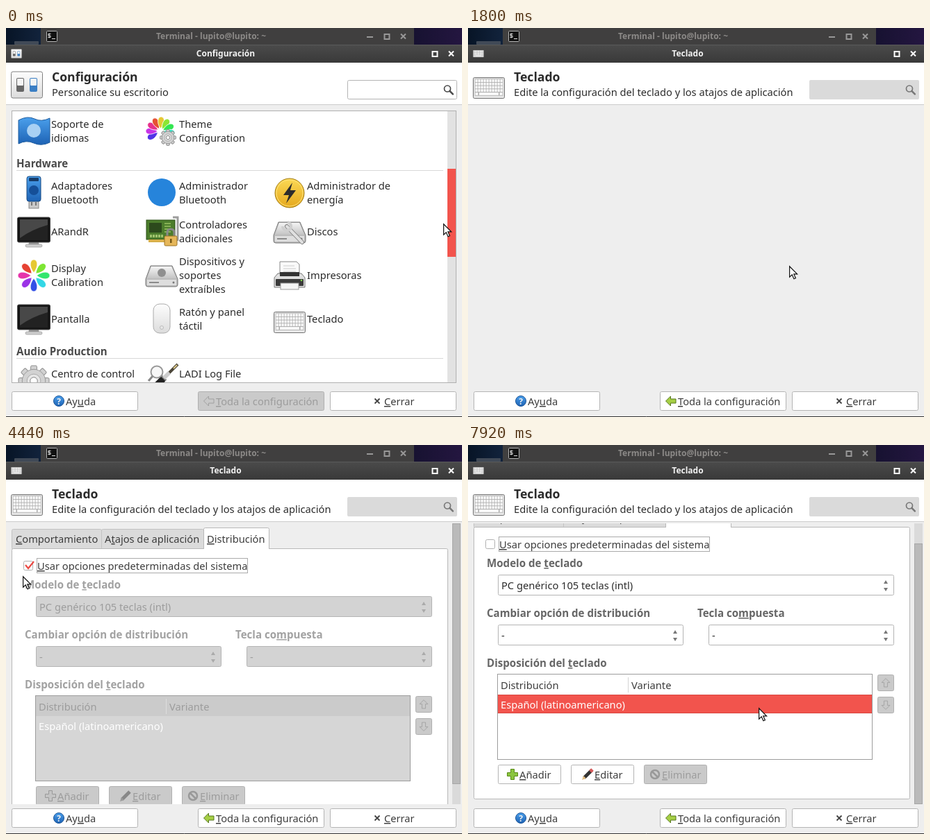
An HTML page that plays this animation: 656 px wide and 561 px high, repeating every 8 s.

```html
<!DOCTYPE html>
<html lang="es">
<head>
<meta charset="utf-8">
<title>Configuración del teclado</title>
<style>
html, body { margin: 0; width: 100%; height: 100%; overflow: hidden; background: #ededed; }
svg { display: block; width: 656px; height: 561px; }
text { font: 14.667px "Noto Sans", sans-serif; fill: #3c3c3c; white-space: pre; }
.ink { fill: #2b2b2b; }
.dim { fill: #9c9c9c; }
.lit { fill: #fff; }
.b { font-weight: bold; font-size: 15.1px; fill: #666; }
.b.sec { fill: #4a4a4a; }
.b.off { fill: #a2a2a2; }
.h { font-weight: bold; font-size: 17.6px; fill: #2b2b2b; }
.w { font-weight: bold; font-size: 12px; fill: #f2f2f2; text-anchor: middle; }
.w.back { fill: #8c8a88; }
.u { text-decoration: underline; text-decoration-thickness: 1px; }

.anim { animation: 8s step-end infinite; }
#list { animation-name: first; }
#board { animation-name: second; }
#behave { animation-name: behave; }
#layoutOff { animation-name: layoutOff; }
#layoutOn { animation-name: layoutOn; }
#pageBar { animation-name: pageBar; }
#items { animation-name: items; }
#thumb { animation-name: thumb; }
#page { animation-name: page; }
#pageThumb { animation-name: pageThumb; }
#cursor { animation-name: cursor; }

@keyframes first { 0% { opacity: 1 } 22.5%, to { opacity: 0 } }
@keyframes second { 0% { opacity: 0 } 22.5%, to { opacity: 1 } }
@keyframes pageBar { 0% { opacity: 0 } 24%, to { opacity: 1 } }
@keyframes behave { 0% { opacity: 0 } 24% { opacity: 1 } 45%, to { opacity: 0 } }
@keyframes layoutOff { 0% { opacity: 0 } 45% { opacity: 1 } 61.5%, to { opacity: 0 } }
@keyframes layoutOn { 0% { opacity: 0 } 61.5%, to { opacity: 1 } }
@keyframes items {
  0% { transform: translateY(0) } 1.5% { transform: translateY(-26px) }
  3% { transform: translateY(-52px) } 4.5%, to { transform: translateY(-76px) }
}
@keyframes thumb {
  0% { transform: translateY(0); fill: #f2544d } 1.5% { transform: translateY(9px); fill: #f2544d }
  3% { transform: translateY(17px); fill: #f2544d } 4.5% { transform: translateY(25px); fill: #f2544d }
  7.5%, to { transform: translateY(25px); fill: #bababa }
}
@keyframes page {
  0% { transform: translateY(0) } 87% { transform: translateY(-4px) } 88.5% { transform: translateY(-10px) }
  90% { transform: translateY(-16px) } 91.5% { transform: translateY(-22px) }
  93% { transform: translateY(-27px) } 94.5%, to { transform: translateY(-31px) }
}
@keyframes pageThumb {
  0% { transform: translateY(0); fill: #bababa } 85.5% { transform: translateY(0); fill: #f2544d }
  87% { transform: translateY(4px); fill: #f2544d } 88.5% { transform: translateY(9px); fill: #f2544d }
  90% { transform: translateY(15px); fill: #f2544d } 91.5% { transform: translateY(21px); fill: #f2544d }
  93% { transform: translateY(25px); fill: #f2544d } 94.5% { transform: translateY(29px); fill: #f2544d }
  97.5%, to { transform: translateY(29px); fill: #bababa }
}
@keyframes cursor {
  0% { transform: translate(629px, 282px) } 1.5% { transform: translate(629px, 289px) }
  3% { transform: translate(629px, 296px) } 4.5% { transform: translate(629px, 303px) }
  6% { transform: translate(625px, 298px) } 7.5% { transform: translate(590px, 275px) }
  9% { transform: translate(548px, 246px) } 10.5% { transform: translate(507px, 223px) }
  12% { transform: translate(497px, 262px) } 13.5% { transform: translate(478px, 316px) }
  15% { transform: translate(462px, 343px) }
  30% { transform: translate(452px, 326px) } 31.5% { transform: translate(430px, 292px) }
  33% { transform: translate(404px, 250px) } 34.5% { transform: translate(378px, 208px) }
  36% { transform: translate(356px, 172px) } 37.5% { transform: translate(342px, 148px) }
  39% { transform: translate(335px, 131px) } 40.5% { transform: translate(332px, 133px) }
  42% { transform: translate(329px, 135px) } 43.5% { transform: translate(327px, 137px) }
  51% { transform: translate(264px, 146px) } 52.5% { transform: translate(166px, 162px) }
  54% { transform: translate(74px, 178px) } 55.5% { transform: translate(24px, 189px) }
  57% { transform: translate(26px, 204px) } 58.5% { transform: translate(29px, 190px) }
  60% { transform: translate(31px, 178px) }
  69% { transform: translate(210px, 250px) } 70.5% { transform: translate(440px, 340px) }
  72% { transform: translate(590px, 384px) }
  75% { transform: translate(556px, 387px) } 76.5% { transform: translate(518px, 386px) }
  78% { transform: translate(498px, 372px) } 79.5% { transform: translate(520px, 360px) }
  81% { transform: translate(568px, 364px) } 82.5% { transform: translate(608px, 374px) }
  84% { transform: translate(631px, 384px) } 85.5% { transform: translate(644px, 386px) }
  87% { transform: translate(644px, 390px) } 88.5% { transform: translate(644px, 395px) }
  90% { transform: translate(644px, 401px) } 91.5% { transform: translate(644px, 407px) }
  93% { transform: translate(644px, 411px) } 94.5% { transform: translate(644px, 415px) }
  97.5% { transform: translate(548px, 396px) } 99%, to { transform: translate(418px, 379px) }
}
</style>
</head>
<body>
<svg id="stage" viewBox="0 0 656 561"></svg>
<script>
// "_x" in a label underlines x as its access key.
const text = (x, y, s, cls = '') =>
  `<text x="${x}" y="${y}" class="${cls}">${s.replace(/_(.)/g, '<tspan class="u">$1</tspan>')}</text>`;
const rect = (x, y, w, h, fill, more = '') =>
  `<rect x="${x}" y="${y}" width="${w}" height="${h}" fill="${fill}" ${more}/>`;
const box = (x, y, w, h, fill = '#fff', line = '#b4b4b4', r = 2) =>
  rect(x + .5, y + .5, w - 1, h - 1, fill, `stroke="${line}" rx="${r}"`);
const path = (d, fill, more = '') => `<path d="${d}" fill="${fill}" ${more}/>`;
const line = (d, color, w = 1, more = '') => path(d, 'none', `stroke="${color}" stroke-width="${w}" ${more}`);
const disc = (x, y, r, fill, more = '') => `<circle cx="${x}" cy="${y}" r="${r}" fill="${fill}" ${more}/>`;
const at = (x, y, s, k = 1) => `<g transform="translate(${x} ${y}) scale(${k})">${s}</g>`;
const range = (n, f) => Array.from({ length: n }, (_, i) => f(i)).join('');
const grad = (id, a, b, vec = 'x2="0" y2="1"') =>
  `<linearGradient id="${id}" ${vec}><stop stop-color="${a}"/><stop offset="1" stop-color="${b}"/></linearGradient>`;

const gear = (r, fill = '#d2d2d2') =>
  range(8, i => rect(-r * .2, -r, r * .4, r * .5, fill, `stroke="#8d8d8d" rx="1.5" transform="rotate(${i * 45})"`)) +
  disc(0, 0, r * .76, fill, 'stroke="#999"') + disc(0, 0, r * .68, fill) +
  disc(0, 0, r * .45, '#e6e6e6', 'stroke="#aaa"') + disc(0, 0, r * .24, '#fff', 'stroke="#888"');
const petals = (n, from, step, hue, r) => range(n, i =>
  path(`M0 -4C${-r * .34} ${-r * .62} ${-r * .22} ${-r} 0 ${-r}S${r * .34} ${-r * .62} 0 -4Z`,
    `hsl(${hue + i * 360 / n} 78% 55%)`, `stroke="#fff" stroke-width=".8" transform="rotate(${from + i * step})"`));
const drive = path('M-16 -14H15L23 5V13Q23 16 20 16H-20Q-23 16 -23 13V5Z', '#bcbcbc', 'stroke="#777"') +
  path('M-15 -13H14L21 4H-21Z', 'url(#metal)') + rect(-21, 6, 42, 8, '#dedede') +
  line('M-18 10H-4', '#8b8b8b', 2) + disc(17, 10, 1.5, '#777');
const loupe = (x, y, r, color, w) =>
  disc(x, y, r, 'none', `stroke="${color}" stroke-width="${w}"`) +
  line(`M${x + r * .75} ${y + r * .75}l${r} ${r}`, color, w * 1.5, 'stroke-linecap="round"');

const icon = {
  flag: path('M-22 -16Q-9 -23 1 -18T23 -19V16Q11 22 0 17T-22 18Z', 'url(#blue)', 'stroke="#1e5c9e"') + disc(0, -1, 10, '#a8d0f3'),
  theme: at(-2, 0, petals(9, -120, 31, 250, 21)) + at(9, 9, gear(11.5)),
  stick: rect(-7, 10, 14, 12, '#c9c9c9', 'stroke="#888"') + line('M-3 13v5M3 13v5', '#777', 2) +
    rect(-10, -24, 20, 36, 'url(#blue)', 'stroke="#174880" rx="3"') + rect(-7, -22, 14, 5, '#173c68', 'rx="1"') + disc(0, -4, 7, '#154f98'),
  radio: disc(0, -1, 20, '#2684db'),
  power: disc(0, 0, 21, 'url(#gold)', 'stroke="#a07a10"') + disc(0, 0, 19, 'none', 'stroke="#ffe27a"') +
    path('M4 -15L-9 3H-1L-5 15L9 -4H1Z', '#2c2c2c'),
  monitor: path('M-7 15H7L8 20H-8Z', '#999') + rect(-12, 18, 24, 4, '#cfcfcf', 'rx="2" stroke="#888" stroke-width=".6"') +
    rect(-23.5, -21, 47, 36, '#151515', 'rx="2" stroke="#4b4b4b"') + rect(-20, -18, 40, 30, '#222') +
    path('M-20 -18H20V-10Q-4 -3 -20 9Z', '#484848'),
  card: rect(-22, -17, 41, 28, '#4c7d2c', 'stroke="#2b4f16"') + rect(-18, -13, 18, 14, '#2c4a1c') +
    range(5, i => rect(-17 + i * 4, 4, 3, 4, '#9fc36d')) + range(4, i => rect(4, -13 + i * 4, 9, 2, '#86b054')) +
    rect(-19, 11, 26, 4, '#d8b04a') + line('M16 -21h7v34', '#9d9d9d', 3) +
    line('M8 6V1Q8 -4 13 -4T18 1V6', '#888', 3) + rect(4, 6, 18, 14, '#e6b75a', 'stroke="#9a7324" rx="1.5"') + rect(12, 10, 2.5, 6, '#755817'),
  disk: drive + line('M-4 -8L18 15', '#878787', 6, 'stroke-linecap="round"') + line('M-4 -8L18 15', '#e0e0e0', 4, 'stroke-linecap="round"') +
    line('M-10 -8A6 6 0 1 0 -3 -14', '#cfcfcf', 4),
  flower: petals(8, 0, 45, 50, 23) + disc(0, 0, 3.5, '#fff', 'opacity=".8"'),
  usb: drive + disc(0, -4, 6, '#8f8f8f'),
  printer: path('M-14 -20H10L14 -16V0H-14Z', '#fafafa', 'stroke="#888"') + line('M-9 -14H7M-9 -10H9M-9 -6H9', '#ccc') +
    path('M-17 -3H17L22 3V17H-22V3Z', '#e0e0e0', 'stroke="#777"') + path('M-14 -5H14V1H-14Z', '#333') +
    rect(-20, 5, 40, 10, '#3b3b3b', 'rx="1"') + rect(-13, 11, 26, 9, '#f5f5f5', 'stroke="#999"') + disc(17, 7, 1.3, '#7bd14a'),
  mouse: rect(-12, -22, 24, 42, 'url(#pale)', 'rx="9" stroke="#aaa"') + disc(0, 12, 2.5, '#e8e8e8', 'stroke="#bbb"'),
  keys: rect(-22.5, -15, 45, 30, '#ddd', 'rx="2" stroke="#777"') + rect(-20, -13, 40, 24, '#aaa') +
    range(4, r => range(10, c => rect(-19.5 + c * 4, -12.4 + r * 4.7, 3.2, 3.9, '#fafafa'))) +
    range(2, i => rect(-19.5 + i * 35, 6.6, 4, 3.8, '#fafafa')) + rect(-14, 6.6, 28, 3.8, '#fafafa') + line('M-21 13H21', '#f4f4f4'),
  gear: gear(22),
  jack: line('M-23 22L-14 13', '#aaa', 4) + line('M-17 16L4 -5', '#777', 9) + line('M-14 13L2 -3', '#222', 9) +
    line('M3 -4L11 -12', '#ccc', 6) + line('M11 -12L23 -24', '#4b4639', 4) + line('M17 -18L22 -23', '#ddc98a', 2) +
    disc(-7, -13, 8.5, '#f7f7f7', 'stroke="#999" stroke-width="2"') + line('M-13 -7L-19 0', '#888', 3),
  globe: disc(0, 0, 20, '#4fa9d6', 'stroke="#2d7ca6"'),
  chip: rect(-20, -20, 40, 40, '#c9c9c9', 'rx="3" stroke="#888"'),
  toggles: rect(-22.5, -19, 45, 38, 'url(#pale)', 'rx="2.5" stroke="#808080"') +
    rect(-15, -10, 11, 20, '#666', 'rx="2"') + rect(-14, -9, 9, 10, '#f4f4f4', 'rx="1"') +
    rect(4, -10, 11, 20, '#3b7fc4', 'rx="2"') + rect(5, -9, 9, 10, '#f4f4f4', 'rx="1"'),
  plus: path('M-2.5 -7.5h5v5h5v5h-5v5h-5v-5h-5v-5h5Z', '#8bc53f', 'stroke="#578a15"'),
  pencil: line('M-5 5L6 -6', '#333', 5) + line('M4 -4L7 -7', '#d65a5a', 5) + path('M-8 8L-6 2L-2 6Z', '#e2bd83'),
  ban: disc(0, 0, 6, 'none', 'stroke="#999" stroke-width="2.5"') + line('M-4 -4L4 4', '#999', 2.5),
  back: path('M-7.5 0L-.5 -7V-3H7V3H-.5V7Z', '#a6cf45', 'stroke="#55761d"'),
};
icon.plusOff = path('M-2.5 -7.5h5v5h5v5h-5v5h-5v-5h-5v-5h5Z', '#c4c4c4', 'stroke="#999"');
icon.pencilOff = line('M-5 5L6 -6', '#888', 5) + path('M-8 8L-6 2L-2 6Z', '#999');
icon.backOff = path('M-7.5 0L-.5 -7V-3H7V3H-.5V7Z', '#c9c9c9', 'stroke="#a0a0a0"');

const winButtons = (x, y, c) => rect(x - 3.5, y - 3, 7, 7, 'none', `stroke="${c}" stroke-width="2"`) +
  line(`M${x + 20} ${y - 3.5}l7 7m0 -7l-7 7`, c, 2);

const item = (col, y, pic, label) => {
  const x = 16 + col * 184, rows = label.split('|');
  return at(x + 24, y, icon[pic]) +
    rows.map((s, i) => text(x + 49, y + 5 + 20 * i - 10 * (rows.length - 1), s, 'ink')).join('');
};
const section = (y, s) => text(15, y, s, 'b sec') + line(`M15 ${y + 4.5}H629`, '#d8d8d8');

const header = (pic, y, title, sub, off) =>
  at(15, 37, icon[pic], .34) + text(316, 41, title, 'w') + at(30, y, icon[pic]) +
  text(66, 77, title, 'h') + text(66, 98, sub, 'ink') +
  (off ? rect(491, 75, 158, 28, '#dadada', 'rx="2"') : box(491, 75, 158, 28)) + loupe(635, 87.5, 4.5, off ? '#777' : '#4a4a4a', 1.7);

const button = (x, y, w, label, tx, pic, on = true) =>
  box(x, y, w, 28, on ? '#fff' : '#cacaca', on ? '#b4b4b4' : '#b0b0b0') +
  (pic ? at(tx - 10, y + 14, icon[pic + (on ? '' : 'Off')] || icon[pic]) : '') +
  text(tx, y + 20, label, on ? '' : 'dim');

const check = (x, y, on) => box(x, y - 7, 14, 14, '#fff', '#b0b0b0') +
  (on ? line(`M${x + 3} ${y - 1}l4 5l8 -10`, '#ea4a44', 2.2) : '');

const slider = (y, knob, end, value) =>
  rect(62.5, y - 2, end - 62, 4, '#fff', 'rx="2" stroke="#b4b4b4"') +
  rect(62.5, y - 2, knob - 62, 4, '#f2544d', 'rx="2" stroke="#cf3d37"') +
  disc(knob, y, 7.5, '#fff', 'stroke="#a8a8a8"') + text(end + 3, y + 6, value);

const tabs = active => {
  const list = [[8, 130, '_Comportamiento', 14], [137, 148, 'A_tajos de aplicación', 142], [284, 95, '_Distribución', 289]];
  return list.map(([x, w], i) => i === active ? '' : box(x, 121, w, 30, '#dbdbdb', '#c2c2c2')).join('') +
    box(8, 149, 628, 393, '#fff', '#b8b8b8') +
    list.map(([x, w, s, tx], i) => (i === active
      ? path(`M${x + .5} 150V121.5Q${x + .5} 119.5 ${x + 2.5} 119.5H${x + w - 2.5}Q${x + w - .5} 119.5 ${x + w - .5} 121.5V150`, '#fff', 'stroke="#b8b8b8"')
      : '') + text(tx, 141, s)).join('');
};

const behave = tabs(0) + text(27, 179, 'General', 'b') +
  check(45, 200, true) + text(65, 206, 'Restaurar estado de Bl_oq Núm al inicio') +
  text(27, 241, 'Configuración de escritura con teclado', 'b') +
  check(45, 262, true) + text(65, 268, '_Activar repetición de teclas') +
  text(60, 295, '_Retraso de repetición:') + slider(314, 315, 575, '500') +
  text(60, 345, 'Velocid_ad de repetición:') + slider(364, 107, 584, '20') +
  text(27, 403, 'Cursor', 'b') + check(45, 424, true) + text(65, 430, '_Mostrar parpadeo') +
  text(60, 457, 'R_etraso de parpadeo:') + slider(476, 357, 575, '1200') +
  text(22, 520, 'Area de prueba:') + box(145, 500, 476, 28);

const layout = on => {
  const tone = on ? 'b' : 'b off', ink = on ? 'ink' : 'dim', fill = on ? '#fff' : '#d3d3d3';
  const combo = (x, y, w, s) => box(x, y, w, 30, fill) + text(x + 5, y + 21, s, ink) +
    path(`M${x + w - 15} ${y + 13}l3 -5l3 5ZM${x + w - 15} ${y + 19}l3 5l3 -5Z`, on ? '#777' : '#aaa');
  const mover = (y, flip) => box(589, y, 24, 24, '#cacaca', '#b0b0b0') +
    `<g transform="translate(601 ${y + 12}) rotate(${flip ? -90 : 90}) scale(.85)">${icon.backOff}</g>`;
  return tabs(2) + check(25, 174, !on) + text(45, 180, '_Usar opciones predeterminadas del sistema') +
    rect(44.5, 163.5, 303, 21, 'none', 'stroke="#555" stroke-dasharray="1 1"') +
    text(27, 207, 'Modelo de _teclado', tone) + combo(43, 218, 570, 'PC genérico 105 teclas (intl)') +
    text(27, 279, 'Cambiar opción de distribución', tone) + combo(43, 290, 267, '-') +
    text(330, 279, 'Tecla co_mpuesta', tone) + combo(346, 290, 267, '-') +
    text(27, 351, 'Disposición del _teclado', tone) +
    box(42, 361, 540, 124, on ? '#fff' : '#d6d6d6', '#9c9c9c', 0) +
    rect(43, 362, 538, 29, on ? '#fff' : '#cbcbcb') + line('M230.5 366V388', on ? '#d4d4d4' : '#dedede') +
    text(47, 383, 'Distribución', on ? '' : 'dim') + text(235, 383, 'Variante', on ? '' : 'dim') +
    (on ? rect(43, 391, 538, 27, '#f2544d') + line('M43 391.5H581M43 417.5H581', '#d9453f') : '') +
    text(47, 411, 'Español (latinoamericano)', 'lit') +
    mover(362) + mover(394, true) +
    button(43, 492, 91, '_Añadir', 74, 'plus', on) + button(148, 492, 91, '_Editar', 182, 'pencil', on) +
    button(253, 492, 91, '_Eliminar', 279, 'ban', false);
};

const layer = (id, s) => `<g id="${id}" class="anim">${s}</g>`;
const clip = (id, s) => `<g clip-path="url(#${id})">${s}</g>`;

const items =
  item(0, 149, 'flag', 'Soporte de|idiomas') + item(1, 149, 'theme', 'Theme|Configuration') +
  section(201, 'Hardware') +
  item(0, 238, 'stick', 'Adaptadores|Bluetooth') + item(1, 238, 'radio', 'Administrador|Bluetooth') +
  item(2, 238, 'power', 'Administrador de|energía') +
  item(0, 294, 'monitor', 'ARandR') + item(1, 294, 'card', 'Controladores|adicionales') + item(2, 294, 'disk', 'Discos') +
  item(0, 357, 'flower', 'Display|Calibration') + item(1, 357, 'usb', 'Dispositivos y|soportes|extraíbles') +
  item(2, 357, 'printer', 'Impresoras') +
  item(0, 420, 'monitor', 'Pantalla') + item(1, 420, 'mouse', 'Ratón y panel|táctil') +
  at(408, 424.5, icon.keys) + text(433, 425, 'Teclado', 'ink') +
  section(472, 'Audio Production') +
  item(0, 509, 'gear', 'Centro de control|de LADI') + item(1, 509, 'jack', 'LADI Log File|Viewer') +
  section(561, 'Sistema') + at(40, 605, icon.globe) + text(249, 589, 'Configuración de', 'ink') + at(408, 605, icon.chip);

document.getElementById('stage').innerHTML =
  '<defs>' + grad('bar', '#4b4b4b', '#393939') + grad('blue', '#4ba0ec', '#1d62b4') + grad('gold', '#fbd955', '#e5a81d') +
  grad('metal', '#f4f4f4', '#c4c4c4') + grad('pale', '#fdfdfd', '#dcdcdc') +
  grad('night', '#071426', '#12233c', '') + grad('dusk', '#171231', '#241640', '') +
  '<clipPath id="listArea"><rect x="9" y="120" width="626" height="391"/></clipPath>' +
  '<clipPath id="pageArea"><rect y="113" width="656" height="405"/></clipPath></defs>' +
  rect(0, 0, 50, 24, 'url(#night)') + rect(12, 19, 35, 5, '#414a57', 'rx="1"') + rect(587, 0, 69, 24, 'url(#dusk)') +
  rect(50, 0, 537, 24, '#403f3f') + box(58, 4, 16, 16, '#111', '#b5b5b5', 1) +
  line('M62 7.5v7M64.5 8.5h-3.5v2.5h3v2.5h-3.5M66 15.5h5', '#ddd') +
  text(295, 16, 'Terminal - lupito@lupito: ~', 'w back') + rect(519, 12, 9, 2, '#989898') + winButtons(548, 12, '#989898') +
  rect(0, 24, 656, 26, 'url(#bar)') + line('M0 24.5H656', '#5a5a5a') + winButtons(617, 37, '#fff') +
  rect(0, 50, 656, 511, '#eee') + rect(0, 50, 656, 60, '#fff') + line('M0 110.5H656', '#cbcbcb') +
  layer('list', header('toggles', 82, 'Configuración', 'Personalice su escritorio') +
    box(8, 119, 640, 393, '#fff', '#b0b0b0', 0) + clip('listArea', layer('items', items)) +
    rect(635, 120, 12, 391, '#e2e2e2') + '<rect id="thumb" class="anim" x="635" y="203" width="12" height="127"/>' +
    button(276, 524, 182, '_Toda la configuración', 302, 'back', false)) +
  layer('board', header('keys', 86.5, 'Teclado', 'Edite la configuración del teclado y los atajos de aplicación', true) +
    button(276, 524, 182, '_Toda la configuración', 302, 'back')) +
  clip('pageArea', layer('page', layer('behave', behave) + layer('layoutOff', layout(false)) + layer('layoutOn', layout(true))) +
    layer('pageBar', rect(642, 113, 12, 405, '#dadada') +
      '<rect id="pageThumb" class="anim" x="642.5" y="113.5" width="11" height="375" stroke="#a6a6a6"/>')) +
  button(8, 524, 182, 'Ay_uda', 86) + disc(76, 538, 7.5, 'url(#blue)', 'stroke="#1c5598"') +
  '<text x="76" y="542.5" class="w">?</text>' +
  button(466, 524, 182, '_Cerrar', 544) + line('M530.5 534.5l7 7m0 -7l-7 7', '#444', 1.8) +
  line('M0 560.5H656', '#333') +
  layer('cursor', path('M.6 .8V16.2L4.2 12.8L6.9 18.8L9.4 17.7L6.8 11.9H11.6Z', '#fff', 'stroke="#111" stroke-width="1.2"'));
</script>
</body>
</html>
```
